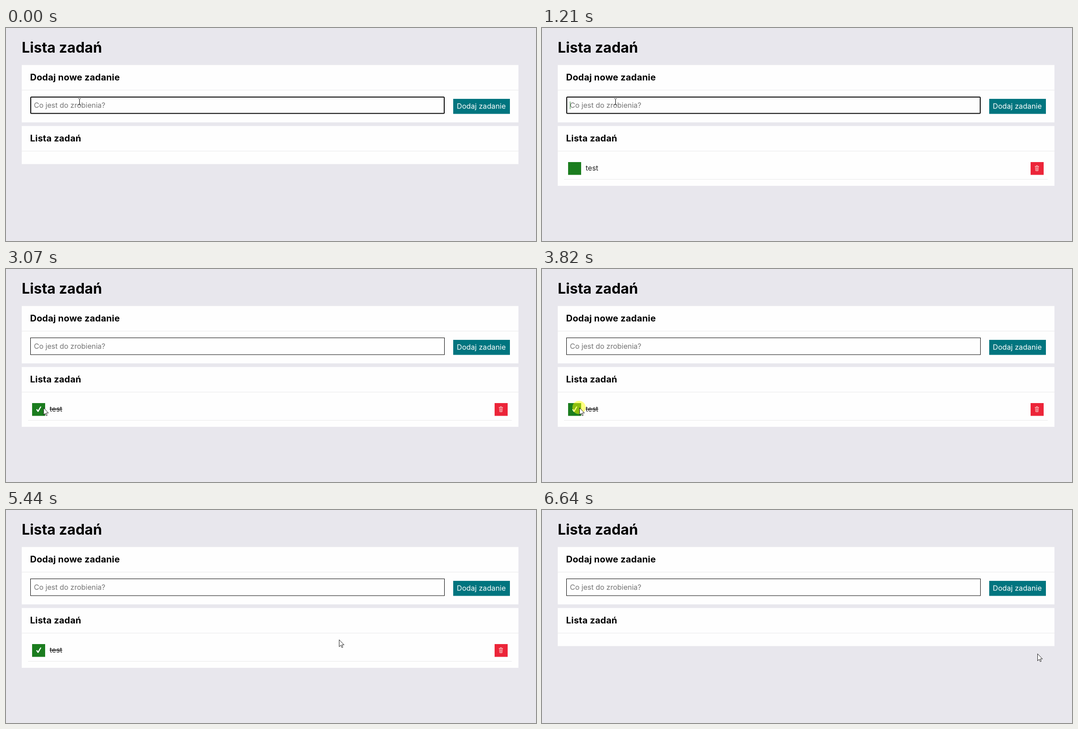
Animation of 1178 by 475 pixels, one loop 6770 ms. Source, as an HTML page:

```html
<!DOCTYPE html>
<html lang="pl">
<head>
<meta charset="utf-8">
<title>Lista zadań</title>
<style>
  html, body { margin: 0; width: 100%; height: 100%; overflow: hidden; background: #e8e7ed; }
  svg { display: block; width: 100vw; height: 100vh; }
  text { font: 400 16px Montserrat, Inter, sans-serif; white-space: pre; }
  .h1 { font-size: 32px; font-weight: 700; }
  .h2 { font-size: 20px; font-weight: 700; letter-spacing: .2px; }
  .rule { fill: #e8e8ea; }
</style>
</head>
<body>
<svg viewBox="0 0 1178 475">
  <rect width="1178" height="475" fill="#e8e7ed"/>
  <text class="h1" x="35" y="55">Lista zadań</text>

  <rect x="35" y="82.5" width="1104" height="128" fill="#fefefe"/>
  <rect class="rule" x="35" y="138" width="1104" height="1"/>
  <text class="h2" x="53.5" y="117">Dodaj nowe zadanie</text>
  <rect id="field" fill="#fefefe" stroke="#000"/>
  <text id="entry" x="62" y="177.5"></text>
  <rect id="caret" y="164" width="1" height="17"/>
  <rect x="994" y="158" width="126" height="33.5" fill="#00757f"/>
  <text x="1002" y="179.5" fill="#fff" letter-spacing=".1">Dodaj zadanie</text>

  <rect id="list" x="35" y="218.5" width="1104" fill="#fefefe"/>
  <rect class="rule" x="35" y="274" width="1104" height="1"/>
  <text class="h2" x="53.5" y="253">Lista zadań</text>

  <g id="item">
    <rect class="rule" x="49" y="337" width="1075" height="1"/>
    <rect x="58" y="299" width="29" height="28.5" fill="#1b7d1f"/>
    <path id="tick" d="M67 313.2L69.3 312.2L71 315.2L76.4 306.6L78.6 306.9L72.2 318.6H70.2Z" fill="#fff"/>
    <text id="task" x="97" y="318" fill="#222">test</text>
    <rect x="1086" y="299" width="29" height="28.5" fill="#ec2539"/>
    <g fill="none" stroke="#fbe3dc">
      <path d="M1095.5 308.5H1104.5M1098.5 307.2H1101.5" stroke-width="1.2"/>
      <path d="M1096.7 309L1097.4 318.5H1102.6L1103.3 309M1099 310V317.5M1101 310V317.5" stroke-width=".9"/>
    </g>
  </g>

  <circle id="press" r="14.8" fill="#ff0" fill-opacity=".5"/>
  <path id="beam" d="M160.5 157.5H162.5L163.5 158.5L164.5 157.5H166.5M163.5 158.5V170.5M160.5 171.5H162.5L163.5 170.5L164.5 171.5H166.5" fill="none" stroke="#000"/>
  <path id="arrow" d="M.5 .7V16.3L4.1 12.9L6.5 18.2L8.7 17.2L6.4 12.1H11.3Z" fill="#fff" stroke="#000" stroke-width=".9"/>
</svg>
<script>
const LOOP = 6770;
const el = id => document.getElementById(id);
const within = (t, a, b) => t >= a && t < b;
const show = (id, on) => el(id).setAttribute('visibility', on ? 'visible' : 'hidden');
function set(id, attrs) {
  for (const k in attrs) el(id).setAttribute(k, attrs[k]);
}

// Pointer stops: time, x, y. Each holds until the next.
const stops = [
  [1830, 160, 172], [1900, 147, 198], [1970, 126, 238], [2040, 103, 281],
  [2110, 82, 316], [2180, 69, 332], [2250, 75, 313], [2320, 85.5, 293],
  [2380, 86.5, 294], [2450, 87, 295], [2520, 86, 300], [2590, 84, 305], [2660, 83, 309]
];

function sweep(t) {
  const step = Math.min(10, Math.floor((t - 5100) / 67.8) + 1);
  const u = step / 10, e = u * u * (3 - 2 * u);
  return [83 + 1014 * e, 309 + 10 * e - 30 * Math.sin(Math.PI * e)];
}

function pointer(t) {
  if (t >= 5780) return [1101, 320];
  if (t >= 5100) return sweep(t);
  return stops.filter(s => s[0] <= t).pop().slice(1);
}

const keys = [70, 340, 540, 810];
const clicks = [[2860, 3070], [3820, 4020], [4680, 4900], [6370, 6640]];

function draw(t) {
  const focused = t < 2860;
  set('field', focused
    ? { x: 55, y: 154, width: 919, height: 36.5, rx: 1.5, 'stroke-width': 2 }
    : { x: 54.5, y: 153.5, width: 920, height: 37.5, rx: 0, 'stroke-width': 1 });

  const typed = t < 1210 ? 'test'.slice(0, keys.filter(k => k <= t).length) : '';
  el('entry').textContent = typed || 'Co jest do zrobienia?';
  set('entry', { fill: typed ? '#111' : '#757575' });

  const caretX = [62, 68, 77, 84, 91][typed.length];
  set('caret', { x: caretX, fill: within(t, 1210, 1280) ? '#2b8a2f' : '#000' });
  show('caret', within(t, 70, 1830) || within(t, 2320, 2860));

  const hasTask = within(t, 1210, 6640);
  const done = within(t, 3070, 4020) || t >= 4900;
  set('list', { height: hasTask ? 133.5 : 85 });
  set('item', { display: hasTask ? 'inline' : 'none' });
  show('tick', done);
  set('task', { 'text-decoration': done ? 'line-through' : 'none' });

  const moving = t >= 1830;
  const [x, y] = moving ? pointer(t) : [163, 165];
  const overField = y < 191;
  show('beam', overField);
  set('beam', { transform: `translate(${x - 163} ${y - 165})` });
  show('arrow', !overField);
  set('arrow', { transform: `translate(${x} ${y})` });
  show('press', clicks.some(([a, b]) => within(t, a, b)));
  set('press', { cx: x - .7, cy: y - .3 });
}

const start = performance.now();
function tick() {
  draw((performance.now() - start) % LOOP);
  requestAnimationFrame(tick);
}
tick();
</script>
</body>
</html>
```
